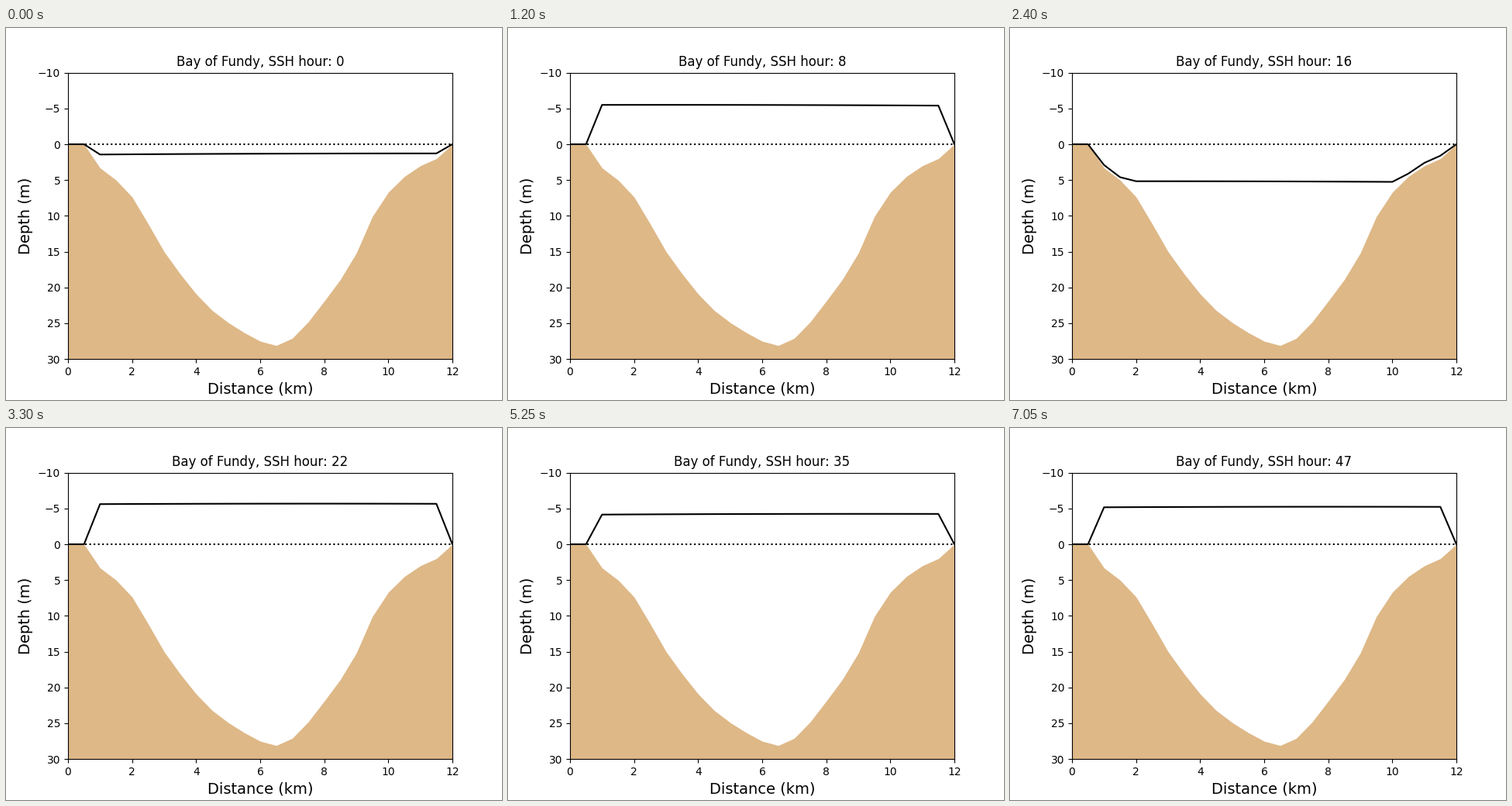
A matplotlib script that plays this animation: 640 by 480 pixels, repeating every 7200 ms.

```python
import numpy as np
import matplotlib.pyplot as plt
from matplotlib.animation import FuncAnimation

plt.rcParams["font.family"] = "DejaVu Sans"

HOURS = 48
STEP_MS = 150
MIN_WATER = 0.4                            # film of water kept on drying flats
PERIODS = np.array([12.42, 12.0, 6.21, 23.93])   # tidal constituents, hours

# Seabed depth every half kilometre
x = np.arange(0, 12.5, 0.5)
bed = np.array([0, 0, 3.3, 5, 7.35, 11.1, 15, 18.1, 20.9, 23.2, 24.9, 26.3,
                27.5, 28.1, 27.1, 24.8, 21.9, 18.9, 15.2, 10.1, 6.7, 4.5,
                3, 2, 0])

# Mid-channel surface depth at a few hours: (hour, metres)
GAUGE = np.array([(0, 1.4), (3, 6.2), (8, -5.43), (14, 5.25), (15, 6.2),
                  (16, 5.28), (22, -5.73), (28, 6.25), (30, 1.19), (40, 6.28),
                  (41, 4.75), (42, 1.72), (47, -5.23)])


def basis(t):
    """Constant plus cosine and sine of every constituent."""
    angle = 2 * np.pi * np.outer(np.atleast_1d(t), 1 / PERIODS)
    pairs = np.stack([np.cos(angle), np.sin(angle)], axis=2)
    return np.hstack([np.ones((len(angle), 1)), pairs.reshape(len(angle), -1)])


def fit_tide(damping=0.01):
    """Harmonic fit; only the minor constituents are damped."""
    a = basis(GAUGE[:, 0])
    weight = np.full(a.shape[1], damping)
    weight[:3] = 0
    return np.linalg.solve(a.T @ a + np.diag(weight), a.T @ GAUGE[:, 1])


tide = fit_tide()


def surface(hour):
    level = (basis(hour) @ tide)[0]
    u = (x - 6.25) / 5.25
    slope = 0.03 + 0.19 * np.sin(2 * np.pi * (hour - 2.55) / PERIODS[0])
    ssh = level + slope * u / 2 + 0.04 * u**2
    return np.where(bed > 0, np.minimum(ssh, bed - MIN_WATER), 0)


fig, ax = plt.subplots(figsize=(6.4, 4.8), dpi=100)
fig.subplots_adjust(left=0.125, right=0.9, bottom=0.11, top=0.88)
ax.set(xlim=(0, 12), ylim=(30, -10))
ax.set_xticks(range(0, 13, 2))
ax.set_yticks(range(-10, 31, 5))
ax.set_xlabel("Distance (km)", fontsize=14)
ax.set_ylabel("Depth (m)", fontsize=14)

ax.fill_between(x, bed, 30, color="burlywood", linewidth=0)
ax.plot([0, 12], [0, 0], "k:", lw=1.5)
water, = ax.plot(x, surface(0), "k", lw=1.5)
title = ax.set_title("", fontsize=12)


def update(hour):
    water.set_ydata(surface(hour))
    title.set_text(f"Bay of Fundy, SSH hour: {hour}")
    return water, title


anim = FuncAnimation(fig, update, frames=HOURS, interval=STEP_MS,
                     repeat=True, repeat_delay=0, blit=False)
plt.show()
```
